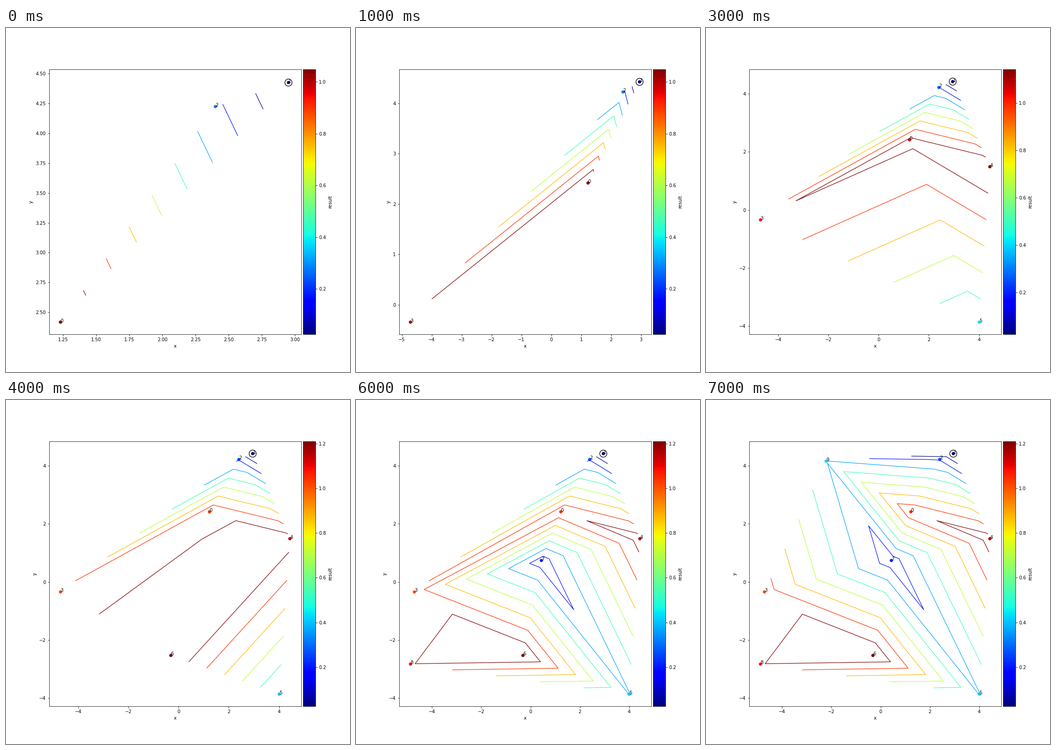
These frames come from a looping animation (748 px wide and 748 px high, 8000 ms). A matplotlib script:

```python
import random

import numpy as np
import matplotlib.pyplot as plt
from matplotlib.animation import FuncAnimation
from mpl_toolkits.axes_grid1 import make_axes_locatable

SIZE, DPI = 748, 72
START, STATES = 3, 8
BOUND = 5
RING_PAD = 0.0105  # the ring around the best sample widens the data range

random.seed(5)
samples = np.array([[random.uniform(-BOUND, BOUND) for _ in "xy"]
                    for _ in range(START + STATES - 1)])

fig = plt.figure(figsize=(SIZE / DPI, SIZE / DPI), dpi=DPI)


def griewank(x, y):
    return 1 + (x**2 + y**2) / 4000 - np.cos(x) * np.cos(y / np.sqrt(2))


def padded(values, best):
    low, high = values.min(), max(values.max(), values[best] + RING_PAD)
    margin = 0.05 * (high - low)
    return low - margin, high + margin


def draw(state):
    fig.clear()
    ax = fig.add_subplot()
    x, y = samples[:START + state].T
    z = griewank(x, y)
    best = z.argmin()

    levels = np.linspace(z.min(), z.max(), 10)[1:-1]
    ax.tricontour(x, y, z, levels=levels, cmap="jet", linewidths=1.2)
    dots = ax.scatter(x, y, c=z, cmap="jet")
    ax.scatter(x[best], y[best], s=240, facecolors="none",
               edgecolors="black", linewidths=1.3)
    for i, (px, py) in enumerate(zip(x, y)):
        ax.text(px, py, str(i))

    ax.set(xlabel="x", ylabel="y",
           xlim=padded(x, best), ylim=padded(y, best))

    cax = make_axes_locatable(ax).append_axes("right", size="5%", pad=0.05)
    fig.colorbar(dots, cax=cax, label="result")
    return []


anim = FuncAnimation(fig, draw, frames=STATES, interval=1000, repeat=True)
plt.show()
```
